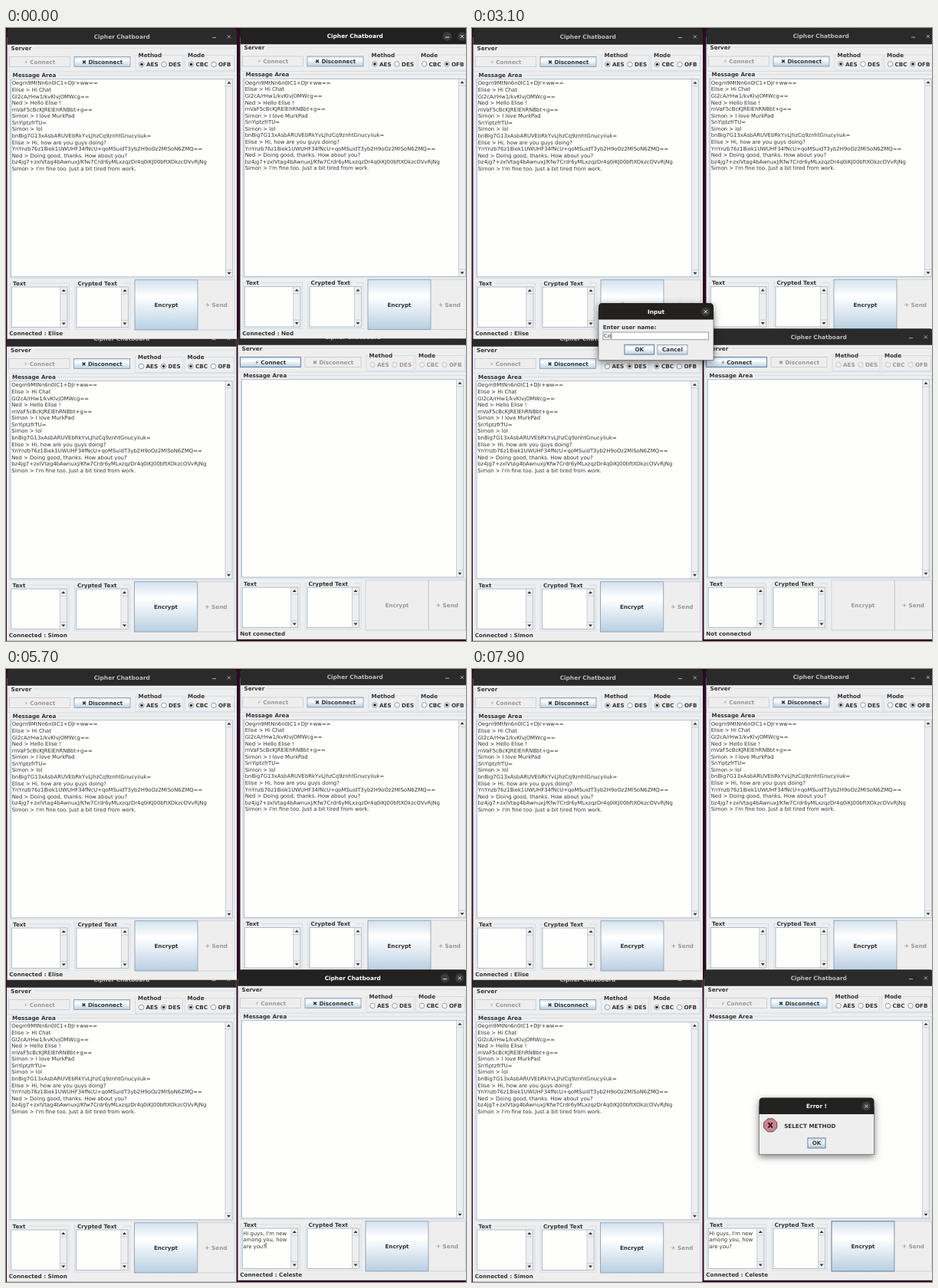
An HTML page for the animation above (8 s loop, 600 by 800 pixels).

```html
<!DOCTYPE html>
<html lang="en">
<head>
<meta charset="utf-8">
<title>Cipher Chatboard</title>
<style>
  html, body { margin: 0; width: 100%; height: 100%; overflow: hidden; background: #2c0a20; }
  svg { display: block; width: 600px; height: 800px; }
  text { font: 6.87px "DejaVu Sans", sans-serif; fill: #333; text-rendering: geometricPrecision; white-space: pre; }
  .b { font-weight: bold; font-size: 7.2px; }
  .off { fill: #999; }
  .mid { text-anchor: middle; }
  .dialog { filter: drop-shadow(0 3px 5px rgba(0, 0, 0, .5)); }
</style>
</head>
<body>
<svg id="stage" viewBox="0 0 600 800">
  <defs>
    <linearGradient id="ocean" x2="0" y2="1">
      <stop offset="0" stop-color="#d3e1ee"/>
      <stop offset=".32" stop-color="#fff"/>
      <stop offset=".38" stop-color="#fafcfd"/>
      <stop offset="1" stop-color="#b8cfe2"/>
    </linearGradient>
  </defs>
  <g id="scene"></g>
</svg>
<script>
const LOOP = 8000;
const TITLE = 'Cipher Chatboard';
const USER = 'Celeste';
const LOG = [
  'Oegm9MtNn6n0IC1+DJr+ww==', 'Elise > Hi Chat',
  'Gl2cA/rHw1/kvKlvjOMWcg==', 'Ned > Hello Elise !',
  'mVaF5cBcKJRElEhRNBbt+g==', 'Simon > I love MurkPad',
  'SnYiptzfrTU=', 'Simon > lol',
  'bnBig7G13xAsbARUVEbRkYvLJhzCq9znhtGnucyiiuk=', 'Elise > Hi, how are you guys doing?',
  'YnYnzb76z18iek1UWUHF34fNcU+qoMSuidT3yb2H9oOz2MlSoN6ZMQ==', 'Ned > Doing good, thanks. How about you?',
  'bz4jg7+zxlVtag4bAwnuxJ/Kfw7Crdr6yMLxzqzDr4q0iKJ00bftXOkzcOVvRjNg',
  'Simon > I\'m fine too. Just a bit tired from work.'
];
const DRAFT = ['Hi guys, I\'m new', 'among you, how', 'are you?'];

// time -> value; the last entry not later than t applies
const TRACKS = {
  raised: [[0, false], [1700, true]],
  ask: [[0, 0], [1700, .35], [1800, .8], [1900, 1], [4100, .5], [4200, 0]],
  typed: [[0, 0], [2900, 1], [3100, 2], [3300, 3], [3500, 4], [3600, 5], [3700, 6], [3900, 7]],
  online: [[0, false], [4200, true]],
  focus: [[0, 'connect'], [4200, 'aes'], [5200, 'text'], [7100, 'encrypt']],
  draft: [[0, false], [5700, true]],
  caret: [[0, false], [5200, true], [6200, false], [6700, true], [7100, false]],
  pressed: [[0, false], [7100, true], [7300, false]],
  error: [[0, 0], [7300, .35], [7400, .8], [7500, 1]]
};

const pen = document.createElement('canvas').getContext('2d');
pen.font = '6.87px "DejaVu Sans", sans-serif';
const widthOf = s => pen.measureText(s).width;

const rect = (x, y, w, h, fill, stroke = 'none', sw = 1) =>
  `<rect x="${x}" y="${y}" width="${w}" height="${h}" fill="${fill}" stroke="${stroke}" stroke-width="${sw}"/>`;
const path = (d, fill, stroke = 'none', sw = 1) =>
  `<path d="${d}" fill="${fill}" stroke="${stroke}" stroke-width="${sw}"/>`;
const circle = (x, y, r, fill, stroke = 'none') =>
  `<circle cx="${x}" cy="${y}" r="${r}" fill="${fill}" stroke="${stroke}" stroke-width=".8"/>`;
const text = (x, y, s, cls = '', style = '') => `<text x="${x}" y="${y}" class="${cls}" style="${style}">${s}</text>`;
const group = (x, y, body) => `<g transform="translate(${x} ${y})">${body}</g>`;
const caretAt = (x, y) => path(`M${x} ${y}v7.4`, 'none', '#333', .8);

function button(x, y, w, h, label, { on = true, focus = false, pressed = false, ring = 0 } = {}) {
  const fill = !on ? '#eee' : pressed ? '#b8cfe5' : 'url(#ocean)';
  const edge = !on ? '#c6cacf' : focus ? '#6a88a8' : '#8497aa';
  return rect(x, y, w, h, fill, edge, focus ? 1.1 : .8) +
    (ring ? rect(x + w / 2 - ring / 2, y + h / 2 - 4.5, ring, 9, 'none', '#a3b8cc', .6) : '') +
    text(x + w / 2, y + h / 2 + 2.7, label, on ? 'b mid' : 'b mid off');
}

function radio(x, label, on, checked, ring) {
  return circle(x, 47.5, 3.3, on ? '#f8fafc' : '#eee', on ? '#7a8a99' : '#bcc0c4') +
    (checked ? circle(x, 47.5, 1.8, '#222') : '') +
    (ring ? rect(x + 5.2, 42.5, 17, 9.5, 'none', '#9fb6cf', .7) : '') +
    text(x + 6, 50.2, label, on ? 'b' : 'b off');
}

function titled(x, y, w, h, label) {
  return rect(x, y, w, h, 'none', '#cddae6', .8) +
    rect(x + 2, y - 2, label.length * 4.9 + 2, 4, '#eee') + text(x + 3.5, y + 2.6, label, 'b');
}

function scrollPane(x, y, w, h) {
  const sx = x + w - 9, mid = sx + 4.5;
  return rect(x, y, w, h, '#fefefd', '#9fb0c0', .8) + rect(sx, y, 9, h, '#eee', '#b3c0cc', .7) +
    path(`M${sx} ${y + 9}h9M${sx} ${y + h - 9}h9`, 'none', '#b4c2cf', .7) +
    path(`M${mid - 2.5} ${y + 6}h5l-2.5 -3zM${mid - 2.5} ${y + h - 6}h5l-2.5 3z`, '#333');
}

function titleBar(w, label, active, withMin) {
  const ink = active ? '#fff' : '#bdbdbb', y = 11.2;
  const shade = active ? circle(w - 10.2, y, 5.8, '#3d3b3b') : '';
  const min = withMin
    ? (active ? circle(w - 29.5, y, 5.8, '#3d3b3b') : '') + path(`M${w - 32} ${y + 1.2}h5`, 'none', ink, .9) : '';
  return path(`M0 21.5V5q0 -5 5 -5H${w - 5}q5 0 5 5V21.5z`, active ? '#222120' : '#2b2a2a') +
    text(w / 2, y + 2.6, label, 'b mid', `fill:${ink};font-size:7.4px`) +
    shade + min + path(`M${w - 12.2} ${y - 2}l4 4m0 -4l-4 4`, 'none', ink, .9);
}

function messenger({ x, y, user, method, mode, active, log = [], online = true, focus, pressed, draft, caret }) {
  const radios = [[177, 'AES'], [206, 'DES'], [241.5, 'CBC'], [271, 'OFB']];
  return group(x, y,
    rect(1.5, 12, 299.5, 393.8, '#eee') + group(1.5, .2, titleBar(299.5, TITLE, active, true)) +
    titled(3, 26, 296, 31, 'Server') +
    button(4.5, 37.5, 79, 13, '⚡\uFE0E Connect', { on: !online, focus: focus === 'connect' }) +
    button(89, 37.5, 73, 13, '✖\uFE0E Disconnect', { on: online }) +
    titled(169, 35.5, 62, 20, 'Method') + titled(233.5, 35.5, 64, 20, 'Mode') +
    radios.map(([rx, name]) =>
      radio(rx, name, online, name === method || name === mode, focus === 'aes' && name === 'AES')).join('') +
    titled(5, 61.3, 293, 265, 'Message Area') +
    scrollPane(6.5, 66.8, 289, 258) +
    log.map((line, i) => text(7.7, 74.4 + i * 8.57, line)).join('') +
    titled(5.5, 333, 77, 60, 'Text') + titled(90, 333, 72, 60, 'Crypted Text') +
    scrollPane(7.3, 338, 72.5, 52.5) + scrollPane(92, 338, 67.5, 52.5) +
    (draft ? DRAFT.map((line, i) => text(8.3, 346.6 + i * 8.57, line)).join('') : '') +
    (caret ? (draft ? caretAt(8.6 + widthOf(DRAFT[2]), 356.8) : caretAt(8.6, 340)) : '') +
    button(168, 328.7, 82, 65.3, 'Encrypt', { on: online, focus: focus === 'encrypt', pressed }) +
    button(250.5, 328.7, 48, 65.3, '✈\uFE0E Send', { on: false }) +
    text(4.2, 401.2, online ? `Connected : ${user}` : 'Not connected', 'b'));
}

function dialog(x, y, alpha, title, body) {
  if (!alpha) return '';
  const k = .9 + .1 * alpha;
  return `<g class="dialog" opacity="${alpha}" transform="translate(${x + 75} ${y + 37}) scale(${k}) translate(-75 -37)">` +
    rect(0, 12, 150, 62.3, '#eee', '#555', .6) + titleBar(150, title, true, false) + group(0, 1, body) + '</g>';
}

function inputDialog(alpha, typed) {
  const name = USER.slice(0, typed);
  return dialog(165, 359, alpha, 'Input',
    text(5.7, 33.3, 'Enter user name:', 'b') +
    rect(6, 37, 137.5, 9.7, '#fff', '#8295a8', .9) + text(7, 44.4, name) +
    caretAt(7.4 + widthOf(name), 38.2) +
    button(34, 53.3, 38.5, 12.8, 'OK', { focus: true }) +
    button(77, 53.3, 39, 12.8, 'Cancel'));
}

function errorDialog(alpha) {
  return dialog(374.5, 559.4, alpha, 'Error !',
    path('M11.2 26.5h7l5 5v7l-5 5h-7l-5 -5v-7z', '#c78791', '#6d4049', 1) +
    path('M12 31.7l5.4 6.6m0 -6.6l-5.4 6.6', 'none', '#42151c', 2) +
    text(32.7, 39, 'SELECT METHOD', 'b') +
    button(63.5, 51.7, 23, 13, 'OK', { focus: true, ring: 15 }));
}

function render(s) {
  const fourth = messenger({
    x: 301, y: 392, user: USER, online: s.online, focus: s.focus, pressed: s.pressed,
    draft: s.draft, caret: s.caret, active: s.online && !s.error
  });
  const others = [
    messenger({ x: -.5, y: 394, user: 'Simon', method: 'DES', mode: 'CBC', log: LOG }),
    messenger({ x: 0, y: 0, user: 'Elise', method: 'AES', mode: 'CBC', log: LOG }),
    messenger({ x: 304, y: -.5, user: 'Ned', method: 'AES', mode: 'OFB', log: LOG, active: !s.raised })
  ];
  const stack = s.raised ? [...others, fourth] : [fourth, ...others];
  return rect(0, 0, 600, 800, '#2c0a20') + stack.join('') + inputDialog(s.ask, s.typed) + errorDialog(s.error);
}

const scene = document.getElementById('scene');
const start = performance.now();
let shown = '';

function tick() {
  const t = Math.max(0, performance.now() - start) % LOOP;
  const state = {};
  for (const name in TRACKS) state[name] = TRACKS[name].filter(([at]) => at <= t).pop()[1];
  const key = JSON.stringify(state);
  if (key !== shown) {
    scene.innerHTML = render(state);
    shown = key;
  }
  requestAnimationFrame(tick);
}
tick();
</script>
</body>
</html>
```
